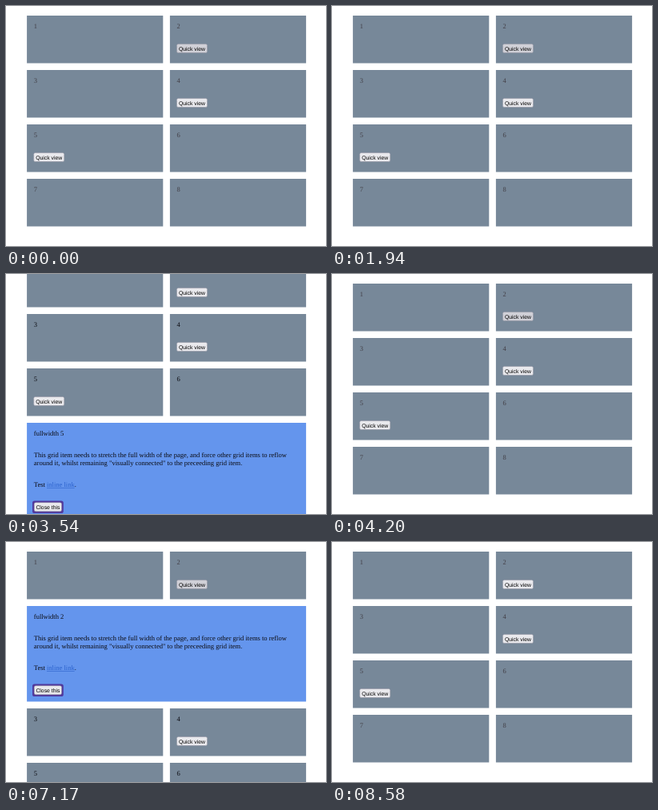
Write an HTML page with a canvas that moves like this. It is 400 px wide and 300 px high and loops after 9.04 s.

```html
<!DOCTYPE html>
<html lang="en">
<head>
<meta charset="utf-8">
<title>Expanding grid</title>
<style>
  html, body { margin: 0; width: 100%; height: 100%; overflow: hidden; background: #fff; }
  canvas { display: block; width: 400px; height: 300px; }
</style>
</head>
<body>
<canvas id="stage"></canvas>
<script>
const LOOP = 9040;
const HOVER_END = 8580;

// Start time, focused item, open item
const STEPS = [
  [0, 0, 0], [400, 4, 0], [1280, 0, 4], [1940, 0, 0], [2730, 5, 0],
  [3540, 0, 5], [4200, 0, 0], [5320, 5, 0], [5850, 4, 0], [6380, 2, 0],
  [7170, 0, 2], [7980, 0, 0]
];

const COLS = [26.1, 204.9];
const TOP = 12, PITCH = 68, GAP = 8.5;
const CARD_W = 170.2, CARD_H = 59.5, PANEL_W = 349;
const PAD = 8.7, LINE = 10.1, PARA = 27;
const SERIF = '8.5px "Liberation Serif", "Times New Roman", serif';
const SANS = '6.85px "Liberation Sans", Arial, sans-serif';
const INK = '#0c0c12', MUTED = '#423f46';

const INTRO = [
  'This grid item needs to stretch the full width of the page, and force other grid items to reflow',
  'around it, whilst remaining "visually connected" to the preceeding grid item.'
];
const LOREM = [
  'Lorem ipsum dolor sit amet consectetur adipisicing elit. Modi temporibus dolore quo eaque',
  'ipsum voluptatem deserunt dolorum laborum cum id labore deleniti voluptas, quod sed,',
  'molestiae ab aspernatur omnis eos.'
];
const PANELS = {
  2: { paras: [INTRO], height: 119.5, scroll: 0 },
  4: { paras: [INTRO, LOREM], height: 166.7, scroll: 9.5 },
  5: { paras: [INTRO], height: 119.5, scroll: 30 }
};

const canvas = document.getElementById('stage');
const ctx = canvas.getContext('2d');
const dpr = window.devicePixelRatio || 1;
canvas.width = 400 * dpr;
canvas.height = 300 * dpr;
ctx.scale(dpr, dpr);
ctx.textRendering = 'geometricPrecision';

function box(x, y, w, h, color) {
  ctx.fillStyle = color;
  ctx.fillRect(x, y, w, h);
}

function text(str, x, y, color = INK, font = SERIF) {
  ctx.font = font;
  ctx.fillStyle = color;
  ctx.fillText(str, x, y);
  return ctx.measureText(str).width;
}

function roundRect(x, y, w, h, r) {
  ctx.beginPath();
  ctx.roundRect(x, y, w, h, r);
}

function button(label, x, y, w, { hover = false, ring = '' } = {}) {
  const h = 11.6;
  if (ring) {
    roundRect(x - 2, y - 2, w + 4, h + 4, 2.6);
    ctx.fillStyle = ring;
    ctx.fill();
  }
  roundRect(x + 0.25, y + 0.25, w - 0.5, h - 0.5, 1.9);
  ctx.fillStyle = hover ? '#d0d0d7' : '#e9e9ed';
  ctx.fill();
  ctx.strokeStyle = '#8f8f9d';
  ctx.lineWidth = 0.5;
  ctx.stroke();
  ctx.textAlign = 'center';
  text(label, x + w / 2, y + 8.3, '#000', SANS);
  ctx.textAlign = 'left';
}

function card(n, x, y, color, focus, hover) {
  box(x, y, CARD_W, CARD_H, '#778899');
  text(n, x + PAD, y + 16, color);
  if (PANELS[n]) {
    button('Quick view', x + PAD - 0.4, y + 35.2, 38.6, { hover, ring: focus ? '#663399' : '' });
  }
}

function panel(n, y) {
  const { paras, height } = PANELS[n];
  const x = COLS[0] + PAD;
  box(COLS[0], y, PANEL_W, height, '#6495ed');
  let base = y + 16;
  text('fullwidth ' + n, x, base);
  for (const lines of paras) {
    base += PARA;
    lines.forEach((line, i) => text(line, x, base + i * LINE));
    base += (lines.length - 1) * LINE;
  }
  base += PARA;
  const linkX = x + text('Test ', x, base);
  const linkW = text('inline link', linkX, base, '#2b62cc');
  box(linkX, base + 0.9, linkW, 0.6, '#2b62cc');
  text('.', linkX + linkW, base);
  button('Close this', x + 0.2, y + height - 20.1, 34.8, { ring: '#51389c' });
}

function draw(t) {
  const [, focus, open] = STEPS.filter(s => s[0] <= t).pop();
  const scroll = open ? PANELS[open].scroll : 0;
  const openRow = open ? Math.ceil(open / 2) : Infinity;
  box(0, 0, 400, 300, '#fff');
  let y = TOP - scroll;
  for (let row = 1; row <= 4; row++) {
    const color = scroll || row > openRow ? INK : MUTED;
    COLS.forEach((x, col) => {
      const n = row * 2 - 1 + col;
      card(n, x, y, color, n === focus, n === 2 && !scroll && t < HOVER_END);
    });
    y += PITCH;
    if (row === openRow) {
      panel(open, y);
      y += PANELS[open].height + GAP;
    }
  }
}

function tick() {
  draw(performance.now() % LOOP);
  requestAnimationFrame(tick);
}
tick();
</script>
</body>
</html>
```
